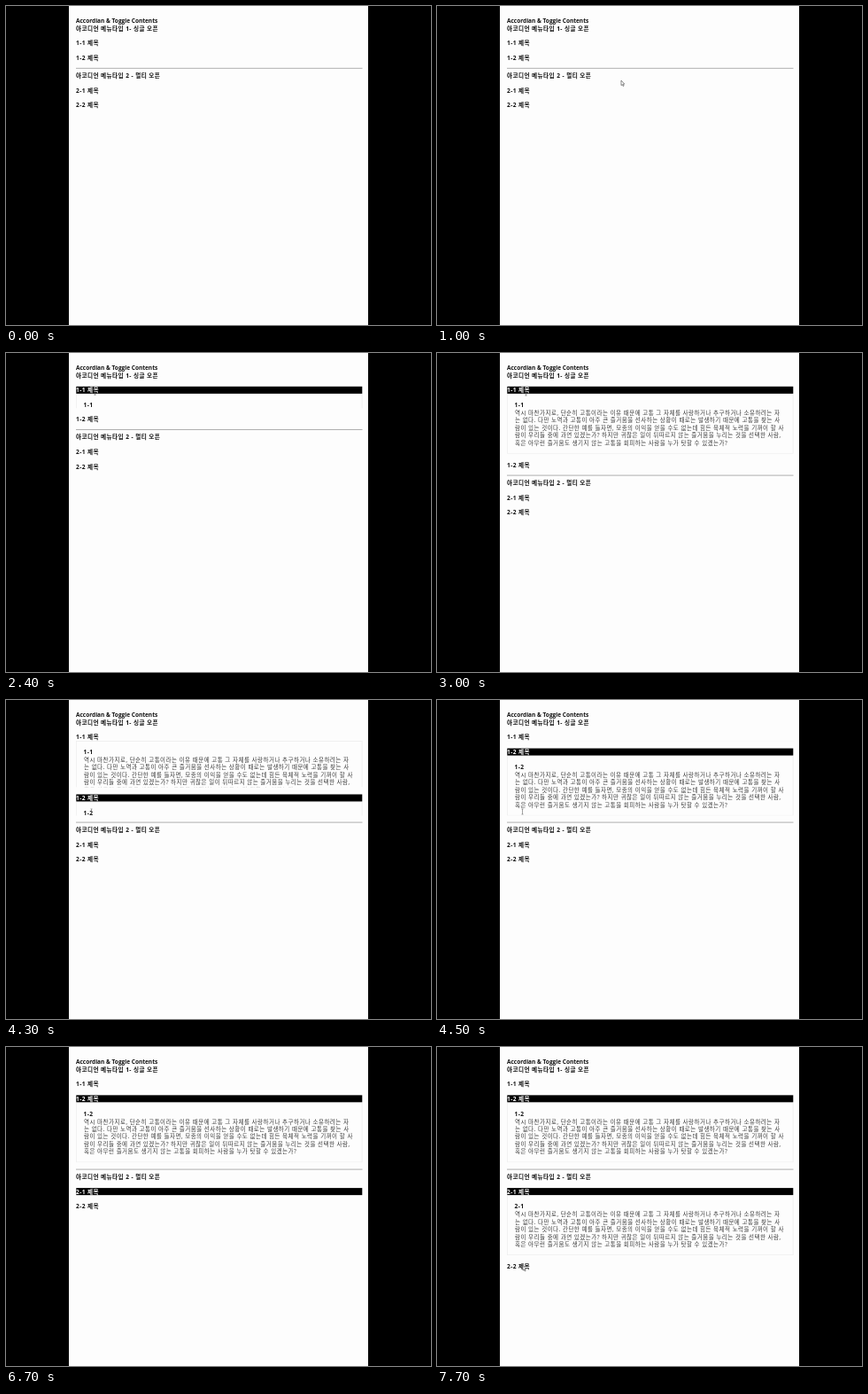
Animation of 480x360 px, one loop 8000 ms. Source, as an HTML page with a canvas:

```html
<!DOCTYPE html>
<html lang="ko">
<meta charset="utf-8">
<style>
  html, body { margin: 0; height: 100%; overflow: hidden; background: #000 }
  canvas { display: block }
</style>
<canvas width="480" height="360"></canvas>
<script>
const ctx = document.querySelector('canvas').getContext('2d');
const LOOP = 8000, STEP = 100;
const LEFT = 79, WIDTH = 323.5, LINE = 8.45, GAP = 8.1, PANEL = 67.8;
const PARAGRAPH = [
  '역시 마찬가지로, 단순히 고통이라는 이유 때문에 고통 그 자체를 사랑하거나 추구하거나 소유하려는 자',
  '는 없다. 다만 노역과 고통이 아주 큰 즐거움을 선사하는 상황이 때로는 발생하기 때문에 고통을 찾는 사',
  '람이 있는 것이다. 간단한 예를 들자면, 모종의 이익을 얻을 수도 없는데 힘든 육체적 노력을 기꺼이 할 사',
  '람이 우리들 중에 과연 있겠는가? 하지만 귀찮은 일이 뒤따르지 않는 즐거움을 누리는 것을 선택한 사람,',
  '혹은 아무런 즐거움도 생기지 않는 고통을 회피하는 사람을 누가 탓할 수 있겠는가?'
];
// Pointer path: time, x, y
const PATH = [
  [800, 246, 106], [1200, 170, 62], [1600, 130, 31], [1800, 100.5, 43.5],
  [3000, 100.5, 45], [3400, 99, 80], [3900, 96.5, 126], [5300, 96.5, 126],
  [5400, 96.5, 135.5], [5700, 97, 148], [6100, 97.5, 163], [7100, 97.5, 163],
  [7500, 97.5, 245], [7700, 97, 246.5]
];

const clamp = v => Math.min(1, Math.max(0, v));
const swing = (t, start, length) => .5 - Math.cos(Math.PI * clamp((t - start) / length)) / 2;

function text(str, x, y, { size = 6.6, weight = 700, color = '#111', spacing = .42 } = {}) {
  ctx.font = `${weight} ${size}px "Open Sans", "Noto Sans CJK KR", sans-serif`;
  ctx.letterSpacing = spacing + 'px';
  ctx.fillStyle = color;
  ctx.fillText(str, x, y);
}

function panel(label, y, height) {
  if (height <= 0) return;
  ctx.save();
  ctx.beginPath();
  ctx.rect(LEFT, y, WIDTH + 1, height);
  ctx.clip();
  ctx.strokeStyle = '#eee';
  ctx.lineWidth = .8;
  ctx.strokeRect(LEFT + .4, y + .4, WIDTH - .8, PANEL - .8);
  text(label, 87.6, y + 15);
  PARAGRAPH.forEach((line, i) => text(line, 88, y + 23.9 + i * LINE,
    { size: 6.5, weight: 400, color: '#3a3a3a', spacing: .48 }));
  ctx.restore();
}

// Draws a title with its panel and returns the top of the next item
function item(label, y, open, active) {
  if (active) {
    ctx.fillStyle = '#000';
    ctx.fillRect(LEFT + .3, y + .2, WIDTH - .5, LINE - .4);
  }
  text(label + ' 제목', LEFT, y + 6.7, { color: active ? '#fff' : '#111' });
  panel(label, y + LINE, open * PANEL);
  return y + LINE + open * PANEL + GAP;
}

function pointer(t) {
  if (t < PATH[0][0]) return;
  let i = PATH.findIndex(p => p[0] > t);
  if (i < 0) i = PATH.length;
  const a = PATH[i - 1], b = PATH[i] || a;
  const k = b === a ? 0 : (t - a[0]) / (b[0] - a[0]);
  const x = a[1] + (b[1] - a[1]) * k, y = a[2] + (b[2] - a[2]) * k;
  const overText = t >= 1800 && t <= 3000 || t >= 3900 && t < 5400 || t >= 6100 && t <= 7100;
  ctx.lineWidth = .6;
  if (overText) {
    ctx.strokeStyle = '#666';
    ctx.stroke(new Path2D(`M${x - 1} ${y - 3}h2m-1 0v6m-1 0h2`));
  } else {
    ctx.fillStyle = '#fff';
    ctx.strokeStyle = '#444';
    const arrow = new Path2D(`M${x} ${y}v5.6l1.3-1.1 .9 2 .9-.4-.9-2h1.6z`);
    ctx.fill(arrow);
    ctx.stroke(arrow);
  }
}

function draw(t) {
  ctx.fillStyle = '#000';
  ctx.fillRect(0, 0, 480, 360);
  ctx.fillStyle = '#fdfdfd';
  ctx.fillRect(71, 0, 338, 360);

  const change = swing(t, 4201, 310);
  text('Accordian & Toggle Contents', LEFT, 19, { size: 6.5, spacing: 0 });
  text('아코디언 메뉴타입 1- 싱글 오픈', LEFT, 27.9);
  let y = item('1-1', 37.6, swing(t, 2270, 400) - change, t >= 2300 && t < 4300);
  y = item('1-2', y, change, t >= 4300);

  ctx.fillStyle = '#b0b0b0';
  ctx.fillRect(LEFT, y - .9, WIDTH, 1);
  text('아코디언 메뉴타입 2 - 멀티 오픈', LEFT, y + 10.6);
  y = item('2-1', y + 20.4, swing(t, 6690, 400), t >= 6700);
  item('2-2', y, 0, false);
  pointer(t);
}

function frame(now) {
  draw(Math.floor(now % LOOP / STEP) * STEP);
  requestAnimationFrame(frame);
}
frame(performance.now());
</script>
</html>
```
